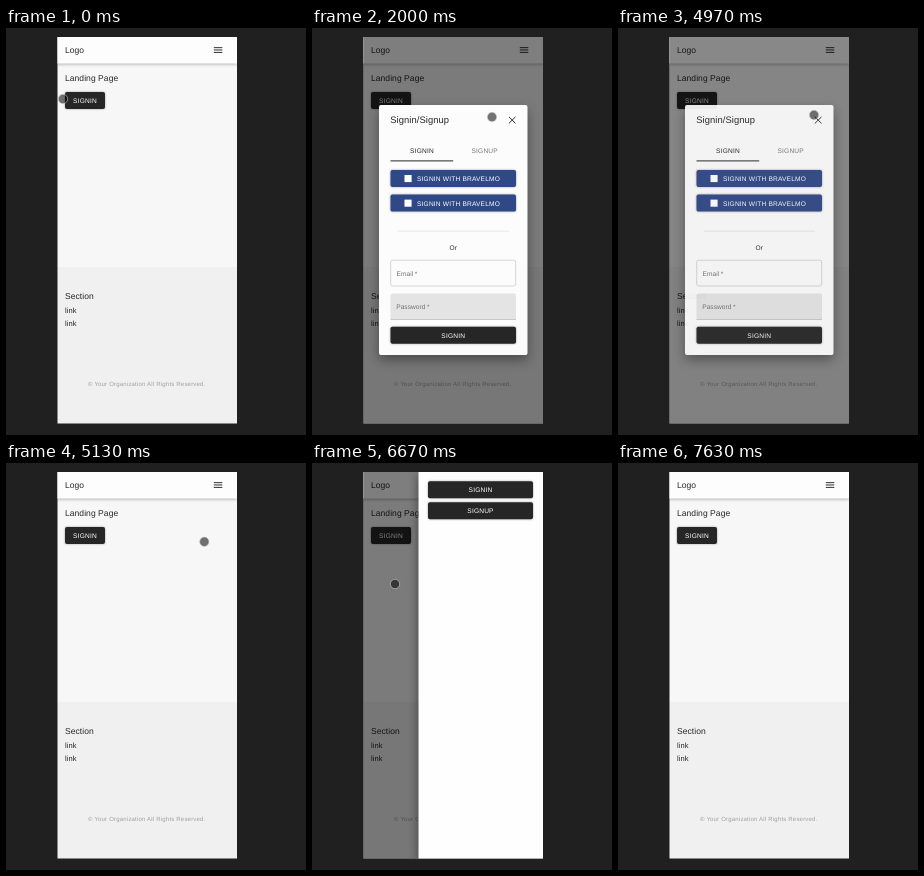
Recreate the animation shown at these times as an HTML page. Size 300 by 407 pixels, loop 9.83 s.

```html
<!DOCTYPE html>
<html lang="en">
<head>
<meta charset="utf-8">
<title>Sign-in dialog and drawer</title>
<style>
  html, body { margin: 0; width: 100%; height: 100%; overflow: hidden; background: #202020; }
  svg { display: block; width: 300px; height: 407px; }
  text {
    font-family: "Liberation Sans", Arial, sans-serif;
    fill: #262626;
    text-rendering: geometricPrecision;
    white-space: pre;
  }
  .raised { filter: drop-shadow(0 .8px .8px rgba(0,0,0,.35)); }
  .bar { filter: drop-shadow(0 1.2px 1.8px rgba(0,0,0,.28)); }
  .paper { filter: drop-shadow(0 5px 6px rgba(0,0,0,.38)); }
  .sheet { filter: drop-shadow(-1px 3px 5px rgba(0,0,0,.4)); }
</style>
</head>
<body>
<svg id="stage" viewBox="0 0 300 407"></svg>
<script>
const LOOP = 9830;
const NS = "http://www.w3.org/2000/svg";
const INK = "#262626", BLUE = "#2f4886", BLUE_HOVER = "#263b70";
const stage = document.getElementById("stage");

function add(parent, tag, attrs = {}) {
  const el = document.createElementNS(NS, tag);
  for (const k in attrs) el.setAttribute(k, attrs[k]);
  return parent.appendChild(el);
}

function rect(parent, x, y, width, height, fill, more) {
  return add(parent, "rect", { x, y, width, height, fill, ...more });
}

// spacing is in em
function label(parent, str, x, y, size, spacing, more = {}) {
  const el = add(parent, "text", { x, y, "font-size": size, "letter-spacing": size * spacing, ...more });
  el.textContent = str;
  return el;
}

function caps(parent, str, x, y, fill) {
  return label(parent, str, x, y, 6.58, 0.0286, { "text-anchor": "middle", style: `fill:${fill}` });
}

function button(parent, str, x, y, w, fill = INK) {
  const box = rect(parent, x, y, w, 17, fill, { rx: 1.9, class: "raised" });
  caps(parent, str, x + w / 2, y + 10.9, "#fff");
  return box;
}

// Landing page
const clip = add(add(stage, "defs"), "clipPath", { id: "page" });
rect(clip, 51.5, 9, 179.5, 386.5);
rect(stage, 0, 0, 300, 407, "#202020");
const page = add(stage, "g", { "clip-path": "url(#page)" });

rect(page, 51, 9, 180, 230, "#f7f7f7");
rect(page, 51, 239, 180, 157, "#f0f0f0");
rect(page, 51, 9, 180, 26.5, "#fdfdfd", { class: "bar" });
label(page, "Logo", 59, 25, 8.5, 0.0075);
for (const y of [19.2, 21.5, 23.9]) rect(page, 207.8, y, 8.5, 0.95, INK);
label(page, "Landing Page", 59, 52.6, 8.5, 0.0075);
button(page, "SIGNIN", 59, 64, 40);
label(page, "Section", 59, 271.4, 8.5, 0.0075);
label(page, "link", 59, 284.6, 7.52, 0.0094);
label(page, "link", 59, 298, 7.52, 0.0094);
label(page, "© Your Organization All Rights Reserved.", 82, 358.4, 6, 0.0333, { style: "fill:#a0a0a0" });

const shade = rect(page, 51, 9, 180, 387, "#000");

// Dialog, one copy per tab
function makeDialog(signup) {
  const height = signup ? 283 : 250;
  const g = add(page, "g", { transform: `translate(0 ${signup ? 60.5 : 77})` });
  rect(g, 67, 0, 148.5, height, "#fcfcfc", { rx: 1.9, class: "paper" });
  label(g, "Signin/Signup", 78.3, 18, 9.4, 0.0075);
  add(g, "path", { d: "M196.9 11.8l6.6 6.6m0-6.6l-6.6 6.6", stroke: INK, "stroke-width": 0.95 });

  caps(g, "SIGNIN", 110, 48, signup ? "#777" : INK);
  caps(g, "SIGNUP", 172.7, 48, signup ? INK : "#777");
  const line = rect(g, 78.5, 55.4, 62.7, 1, INK);

  const social = [65, 89.6].map(y => {
    const box = rect(g, 78.5, y, 125.5, 17, BLUE, { rx: 1.9, class: "raised" });
    rect(g, 92.5, y + 5, 7.1, 7.1, "#fff");
    label(g, "SIGNIN WITH BRAVELMO", 105, y + 10.9, 6.58, 0.0286, { style: "fill:#fff" });
    return box;
  });

  rect(g, 86, 125.8, 111, 0.6, "#d8d8d8");
  label(g, "Or", 141.2, 144.7, 6.58, 0.01, { "text-anchor": "middle" });

  const names = signup ? ["Name", "Email"] : ["Email"];
  let y = 155.2;
  for (const name of names) {
    rect(g, 78.7, y, 125, 25.8, "none", { rx: 1.9, stroke: "#bdbdbd", "stroke-width": 0.6 });
    label(g, name + "\u2009*", 84.6, y + 15.3, 6.58, 0.0094, { style: "fill:#707070" });
    y += 33.2;
  }
  add(g, "path", { d: `M78.5 ${y + 26.2}v-24.3q0-1.9 1.9-1.9h121.7q1.9 0 1.9 1.9v24.3z`, fill: "#e4e4e4" });
  rect(g, 78.5, y + 25.7, 125.5, 0.5, "#a0a0a0");
  label(g, "Password\u2009*", 84.2, y + 15.3, 6.58, 0.0094, { style: "fill:#707070" });
  button(g, signup ? "SIGNUP" : "SIGNIN", 78.5, height - 28.3, 125.5);
  return { g, line, social };
}
const signin = makeDialog(false), signup = makeDialog(true);

// Drawer
const drawer = add(page, "g");
rect(drawer, 106.5, 9, 126, 387, "#fefefe", { class: "sheet" });
button(drawer, "SIGNIN", 116, 18.2, 105);
button(drawer, "SIGNUP", 116, 39.2, 105);

const cursor = add(stage, "circle", {
  r: 4.7, fill: "#000", "fill-opacity": 0.55, stroke: "#d0d0d0", "stroke-opacity": 0.65, "stroke-width": 0.9
});

// Motion
function bezier(x1, y1, x2, y2) {
  const at = (a, b, s) => 3 * (1 - s) * (1 - s) * s * a + 3 * (1 - s) * s * s * b + s * s * s;
  return p => {
    if (p <= 0) return 0;
    if (p >= 1) return 1;
    let lo = 0, hi = 1;
    for (let i = 0; i < 24; i++) {
      const mid = (lo + hi) / 2;
      if (at(x1, x2, mid) < p) lo = mid; else hi = mid;
    }
    return at(y1, y2, lo);
  };
}
const inOut = bezier(0.4, 0, 0.2, 1);
const out = bezier(0, 0, 0.2, 1);
const sharp = bezier(0.4, 0, 0.6, 1);
const glide = bezier(0.35, 0, 0.65, 1);

const ramp = (t, start, length, ease) => ease((t - start) / length);

// time, x, y
const path = [
  [0, 57, 71], [260, 65, 57], [570, 75.5, 70], [1000, 75.5, 70],
  [1830, 183, 91], [2000, 180, 89], [2330, 172, 170], [2670, 172, 122],
  [3000, 172, 122], [3600, 119, 109], [3770, 111, 107], [4100, 111, 107],
  [4700, 196, 87], [5030, 196, 87], [5470, 214, 23], [5880, 214, 23],
  [6030, 220, 48], [6200, 220, 48], [6400, 90, 109], [6550, 90, 109],
  [6670, 83, 121], [7470, 83, 121], [7550, 150, 139], [7630, 246, 98]
];

function cursorAt(t) {
  let i = 1;
  while (i < path.length - 1 && path[i][0] < t) i++;
  const [t0, x0, y0] = path[i - 1], [t1, x1, y1] = path[i];
  const p = ramp(t, t0, t1 - t0, glide);
  return [x0 + (x1 - x0) * p, y0 + (y1 - y0) * p];
}

const show = (el, on) => el.setAttribute("display", on ? "inline" : "none");

function draw(t) {
  const [cx, cy] = cursorAt(t);
  cursor.setAttribute("cx", cx);
  cursor.setAttribute("cy", cy);
  show(cursor, t < 7630);

  const modal = ramp(t, 855, 225, inOut) - ramp(t, 4940, 195, inOut);
  const drawerShade = ramp(t, 5803, 225, inOut) - ramp(t, 7020, 195, inOut);
  shade.setAttribute("opacity", 0.5 * (modal + drawerShade));

  const onSignup = t >= 2865 && t < 3995;
  const slide = ramp(t, 2865, 300, inOut) - ramp(t, 3995, 300, inOut);
  for (const d of [signin, signup]) {
    show(d.g, modal > 0 && (d === signup) === onSignup);
    d.g.setAttribute("opacity", modal);
    d.line.setAttribute("x", 78.5 + 62.7 * slide);
  }
  signin.social.forEach((box, i) => {
    const top = i ? 166.6 : 142;
    const hover = t > 2000 && t < 2670 && cy > top && cy < top + 17;
    box.setAttribute("fill", hover ? BLUE_HOVER : BLUE);
  });

  const open = ramp(t, 5803, 225, out) - ramp(t, 7020, 195, sharp);
  show(drawer, open > 0);
  drawer.setAttribute("transform", `translate(${125 * (1 - open)} 0)`);
}

const begin = performance.now();
function tick() {
  draw((performance.now() - begin) % LOOP);
  requestAnimationFrame(tick);
}
tick();
</script>
</body>
</html>
```
